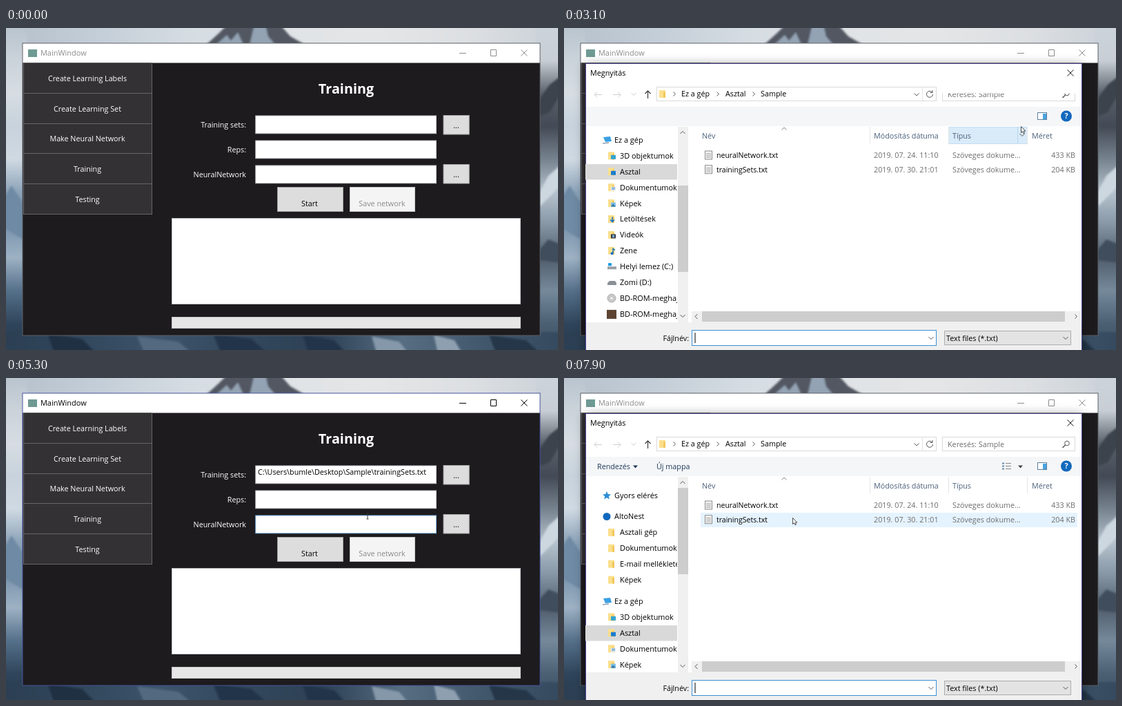
An HTML page that plays this animation: 800x466 px, repeating every 8 s.

```html
<!DOCTYPE html>
<html lang="hu">
<head>
<meta charset="utf-8">
<title>Training</title>
<style>
html, body { margin: 0; width: 100%; height: 100%; overflow: hidden; }
#stage { display: block; width: 800px; height: 466px; font: 10.75px "Open Sans", "Noto Sans", sans-serif; }
text[fill="#fff"]:not([font-weight]) { font-weight: 500; }
.soft { filter: blur(1.6px); }
.k { animation: 8s step-end infinite; }

/* main window */
.title { color: #8c8c8c; animation-name: title; }
.edge { stroke: #5d6068; animation-name: edge; }
.browse { fill: #ddd; stroke: #a0a0a0; }
.sets { animation-name: sets; }
.net { animation-name: net; }
.field { stroke: #c4c6ca; animation-name: field; }
.path { opacity: 0; animation-name: path; }
@keyframes title { 12.5%, 61.25% { color: #000; } 26.25%, 76.25% { color: #8c8c8c; } }
@keyframes edge { 12.5%, 61.25% { stroke: #46559c; } 26.25%, 76.25% { stroke: #5d6068; } }
@keyframes sets {
  22.5%, 28.75% { fill: #bfe1f8; stroke: #5a93bf; }
  25% { fill: #c4e5f6; stroke: #2c628b; }
  57.5% { fill: #ddd; stroke: #a0a0a0; }
}
@keyframes net {
  72.5%, 80% { fill: #bfe1f8; stroke: #5a93bf; }
  75% { fill: #c4e5f6; stroke: #2c628b; }
}
@keyframes field { 63.75% { stroke: #7eb4ea; } 71.25% { stroke: #c4c6ca; } }
@keyframes path { 61.25% { opacity: 1; } }

/* file dialog */
.dialog { opacity: 0; transform-origin: 391px 243px; animation-name: dialog; }
.shadow { filter: drop-shadow(0 3px 8px rgba(0, 0, 0, .45)); }
.content { opacity: 0; animation-name: content; }
.tools { opacity: 0; animation-name: tools; }
.cover { animation-name: cover; }
.column { opacity: 0; animation-name: column; }
.row { fill: #fff; animation-name: row; }
.picked { opacity: 0; animation-name: picked; }
.places { animation-name: places; }
.kids { opacity: 0; animation-name: kids; }
.quick { opacity: 0; animation-name: quick; }
.thumb { y: 228px; height: 125px; animation-name: thumb; }
@keyframes dialog {
  32.5%, 85% { opacity: .05; transform: scale(.93); }
  33.75%, 86.25% { opacity: .15; transform: scale(.945); }
  35%, 87.5% { opacity: .3; transform: scale(.96); }
  36.25%, 88.75% { opacity: .46; transform: scale(.974); }
  37.5%, 90% { opacity: .8; transform: scale(.992); }
  38.75%, 91.25% { opacity: 1; transform: none; }
  57.5% { opacity: .6; transform: scale(.97); }
  58.75% { opacity: .25; transform: scale(.94); }
  60% { opacity: 0; }
}
@keyframes content { 37.5%, 90% { opacity: 1; } 60% { opacity: 0; } }
@keyframes tools { 41.25%, 93.75% { opacity: 1; } 60% { opacity: 0; } }
@keyframes cover { 43.75%, 96.25% { opacity: 0; } 60% { opacity: 1; } }
@keyframes column { 37.5% { opacity: 1; } 43.75% { opacity: 0; } }
@keyframes row { 50%, 96.25% { fill: #e5f3ff; } 55% { fill: #cce8ff; } 60% { fill: #fff; } }
@keyframes picked { 55% { opacity: 1; } 60% { opacity: 0; } }
@keyframes places {
  43.75% { transform: translateY(214.5px); }
  60% { transform: none; }
  96.25% { transform: translateY(161px); }
}
@keyframes kids { 43.75% { opacity: 1; } 60% { opacity: 0; } }
@keyframes quick { 96.25% { opacity: 1; } }
@keyframes thumb {
  43.75% { y: 201px; height: 93px; }
  60% { y: 228px; height: 125px; }
  96.25% { y: 159px; height: 125px; }
}

/* pointer */
.pointer { animation: move 8s linear infinite; }
.arrow { animation-name: arrow; }
.beam { opacity: 0; animation-name: beam; }
@keyframes move {
  0% { transform: translate(700px, 480px); }
  12.5% { transform: translate(700px, 480px); animation-timing-function: steps(8); }
  22.5% { transform: translate(662px, 142px); }
  42.5% { transform: translate(662px, 142px); animation-timing-function: steps(7); }
  51.25% { transform: translate(281px, 209px); }
  61.25% { transform: translate(281px, 209px); animation-timing-function: steps(4); }
  66.25% { transform: translate(524px, 200px); animation-timing-function: steps(5); }
  72.5% { transform: translate(653px, 217px); }
  95% { transform: translate(653px, 217px); animation-timing-function: steps(3); }
  98.75%, 100% { transform: translate(331px, 202px); }
}
@keyframes arrow { 63.75% { opacity: 0; } 71.25% { opacity: 1; } }
@keyframes beam { 63.75% { opacity: 1; } 71.25% { opacity: 0; } }
</style>
</head>
<body>
<svg id="stage" viewBox="0 0 800 466"></svg>
<script>
const group = (cls, ...parts) => `<g class="k ${cls}">${parts.join('')}</g>`;

// y is the middle of the capitals
const text = (x, y, s, fill = '#000', anchor = 'start', extra = '') =>
  `<text x="${x}" y="${y + 3.9}" fill="${fill}" text-anchor="${anchor}" ${extra}>${s}</text>`;

const rect = (x, y, w, h, fill, stroke, cls = '') => {
  const o = stroke ? .5 : 0;
  return `<rect x="${x + o}" y="${y + o}" width="${w - 2 * o}" height="${h - 2 * o}" ` +
    `fill="${fill}" stroke="${stroke || 'none'}" class="${cls}"/>`;
};

const path = (d, stroke = 'none', fill = 'none', w = 1) =>
  `<path d="${d}" stroke="${stroke}" fill="${fill}" stroke-width="${w}"/>`;
const circle = (x, y, r, fill, stroke = 'none') =>
  `<circle cx="${x}" cy="${y}" r="${r}" fill="${fill}" stroke="${stroke}"/>`;
const down = (x, y, c = '#555') => path(`M${x - 3.5} ${y - 2}l3.5 3.5 3.5-3.5`, c);
const up = (x, y, c = '#555') => path(`M${x - 3.5} ${y + 2}l3.5-3.5 3.5 3.5`, c);
const right = (x, y, c = '#555') => path(`M${x - 1.5} ${y - 3}l3 3-3 3`, c);
const left = (x, y, c = '#555') => path(`M${x + 1.5} ${y - 3.5}l-3.5 3.5 3.5 3.5`, c);
const cross = (x, y, c) => path(`M${x - 4.5} ${y - 4.5}l9 9m0-9l-9 9`, c);

// evenly spaced colour stops
const gradient = (id, x2, y2, ...colors) =>
  `<linearGradient id="${id}" x2="${x2}" y2="${y2}">` +
  colors.map((c, i) => `<stop offset="${i / (colors.length - 1)}" stop-color="${c}"/>`).join('') +
  '</linearGradient>';

// soft tones of a snowy ridge around the window
function mountains() {
  const slope = (x, y, w, c) => path(`M${x} ${y}l${w} 8 ${w * .4} 20h${-w * 1.2}z`, 'none', c);
  return '<defs>' +
    gradient('sky', 1, 0, '#b4bfca', '#c3cdd7', '#d5dce2', '#dfe3e6', '#e4e5e6', '#dcdfe2', '#c9d0d7') +
    gradient('west', 0, 1, '#b9c4ce', '#cbd3da', '#d6dce2', '#c7d2dc', '#cfd9e2', '#8ca3b8', '#7893ac',
      '#9db1c3', '#55708a', '#2f455b', '#25374a') +
    gradient('east', 0, 1, '#ccd3da', '#c8ced4', '#59606a', '#434a55', '#76838f', '#b6c3ce', '#8595a4',
      '#505d6c', '#75899b', '#4c6074', '#34475a') +
    gradient('south', 1, 0, '#2b3e52', '#31475c', '#3c536a', '#33485d', '#2d4054', '#566d82', '#41576c',
      '#34495e') + '</defs>' +
    '<g class="soft">' +
    rect(-9, -9, 818, 40, 'url(#sky)') + rect(-9, 0, 40, 475, 'url(#west)') +
    rect(768, 0, 41, 475, 'url(#east)') + rect(-9, 440, 818, 35, 'url(#south)') +
    path('M286 28l22-20 14-14h74l16 18 28 16z', 'none', '#525762') +
    path('M300 28l20-18 6 8 10-12 10 22zM352 28l8-34h16l4 18 14 16z', 'none', '#93a3b4') +
    path('M772 104l16-22 18-14v24l-18 30-16 6z', 'none', '#3c434d') +
    path('M772 240l14-26 20-18v30l-34 34z', 'none', '#cdd7e0') +
    path('M772 322l14-16 20 8v26l-34-4z', 'none', '#3f4d5c') +
    path('M-6 250l14-22 20 30v50l-34-20z', 'none', '#6f8aa4') +
    slope(60, 442, 50, '#1f3042') + slope(190, 446, 60, '#52697f') + slope(300, 442, 56, '#22344a') +
    slope(430, 444, 46, '#22344a') + slope(530, 446, 40, '#8498a9') + slope(620, 444, 30, '#8ea0b0') +
    slope(700, 444, 54, '#243648') + '</g>';
}

function mainWindow() {
  const menu = ['Create Learning Labels', 'Create Learning Set', 'Make Neural Network', 'Training', 'Testing'];
  const items = menu.map((s, i) => {
    const y = 51 + i * 43.75;
    return rect(25, Math.round(y) - 1, 187, 45, '#333133', '#666466') + text(118, y + 22, s, '#fff', 'middle');
  });
  const labels = ['Training sets:', 'Reps:', 'NeuralNetwork'];
  const fields = labels.map((s, i) =>
    text(348, 140 + 36 * i, s, '#fff', 'end') +
    `<rect x="361.8" y="${127 + 36 * i}" width="261.700" height="25.700" fill="#fff" ` +
    (i < 2 ? 'stroke="#c4c6ca"/>' : 'class="k field"/>'));
  const browse = (y, cls) => rect(634, y + .5, 37.3, 27.5, '#ddd', '', 'k browse ' + cls) +
    text(652.5, y + 15, '...', '#000', 'middle');
  return rect(24, 22, 750, 423, '#1d1b1d') +
    rect(24, 22, 750, 28.5, '#fff') + rect(32, 31, 13, 11, '#6f9a94') +
    group('title',
      text(50, 36.5, 'MainWindow', 'currentColor', 'start', 'font-size="10.95"'),
      path('M657 36.5h10M702.5 31.5h8v9h-8z', 'currentColor'), cross(751, 36, 'currentColor')) +
    items.join('') +
    text(493, 91, 'Training', '#fff', 'middle', 'font-size="19.8" font-weight="700"') +
    fields.join('') +
    group('path', text(365, 136.5, 'C:\\Users\\bumle\\Desktop\\Sample\\trainingSets.txt')) +
    browse(126, 'sets') + browse(197, 'net') +
    rect(393, 230, 96, 36, '#ddd', '#a0a0a0') + text(440, 254, 'Start', '#000', 'middle') +
    rect(498, 230, 95, 36, '#f4f4f4', '#c4c7c9') + text(545, 254, 'Save network', '#8a8a8a', 'middle') +
    rect(240, 275, 506, 125, '#fff', '#b8bac0') +
    rect(240, 418, 506, 17, '#e6e6e6', '#c4c4c4') +
    `<rect x="24" y="22" width="750" height="423" fill="none" class="k edge"/>`;
}

// small pictures in the folder tree, centred on x, y
function icon(kind, x, y) {
  const folder = rect(x - 5, y - 5.5, 9, 11, '#fbdf8c') + rect(x + 1, y - 3, 3, 8.5, '#f2c75c');
  const badge = c => folder + rect(x - 1, y - 1, 7, 6, c);
  switch (kind) {
    case 'folder': return folder;
    case 'cube': return badge('#35a4cf');
    case 'desk': return badge('#1c7cd0');
    case 'doc': return badge('#e9f1f8') + path(`M${x} ${y + .5}h5m-5 2h5`, '#4a86c0');
    case 'image': return badge('#7fbfe8') + path(`M${x - 1} ${y + 5}l3-4 4 4z`, 'none', '#3279a8');
    case 'load': return folder + path(`M${x + 1} ${y - 3}v7m-3-3l3 3 3-3`, '#1673c9', 'none', 1.6);
    case 'film': return badge('#333a44') + rect(x + 1, y, 3, 4, '#7aa7d0');
    case 'note': return folder + path(`M${x + 2} ${y + 4}v-7l3 2`, '#1673c9', 'none', 1.4) + circle(x + .5, y + 4, 2, '#1673c9');
    case 'pc': return path(`M${x - 5} ${y - 4}l10-1 2 7-9 1z`, 'none', '#3aa0e4') + path(`M${x - 6} ${y + 5}l9-1`, '#8ba0b3', 'none', 1.5);
    case 'cloud': return circle(x, y, 5.5, '#1068bd');
    case 'system': return rect(x - 6, y, 13, 4, '#9aa0a6') + rect(x - 5, y - 5, 5, 4, '#1c9be0');
    case 'drive': return path(`M${x - 6} ${y + 1}l3-3h8l2 3v3h-13z`, 'none', '#8b9197');
    case 'disc': return circle(x, y, 6, '#c9c9c9', '#aaa') + circle(x, y, 1.5, '#fff');
    case 'brown': return rect(x - 7, y - 6, 14, 13, '#5d4432');
    case 'star': return path(`M${x} ${y - 6}l1.7 4 4.3.4-3.2 2.9 1 4.2-3.8-2.2-3.8 2.2 1-4.2-3.2-2.9 4.3-.4z`, 'none', '#2b8fd9');
  }
}

// rows of [label, picture] below an optional heading
function branch(y, head, kids) {
  const step = 22.9;
  return (head ? icon(head[1], 62, y) + text(73, y, head[0]) : '') +
    kids.map(([s, kind], i) => {
      const ky = y + step * (i + 1);
      return icon(kind, 69, ky) + text(81, ky, s);
    }).join('');
}

function tree() {
  const folders = names => names.map(s => [s, 'folder']);
  const places = [['3D objektumok', 'cube'], ['Asztal', 'desk'], ['Dokumentumok', 'doc'], ['Képek', 'image'],
    ['Letöltések', 'load'], ['Videók', 'film'], ['Zene', 'note'], ['Helyi lemez (C:)', 'system'],
    ['Zomi (D:)', 'drive'], ['BD-ROM-meghajtó', 'disc'], ['BD-ROM-meghajtó', 'brown']];
  return `<svg x="31" y="143" width="133" height="283" viewBox="31 143 133 283" font-size="10.9">` +
    group('kids', branch(132, null, folders(['Designs', 'Sample', 'Testing', 'Testing2']))) +
    group('quick', branch(170, ['Gyors elérés', 'star'], [])) +
    group('places', rect(31, 197, 133, 22.5, '#d9d9d9'),
      branch(39.5, ['AltoNest', 'cloud'], folders(['Asztali gép', 'Dokumentumok', 'E-mail mellékletek', 'Képek'])),
      branch(162, ['Ez a gép', 'pc'], places)) + '</svg>' +
    rect(165, 143, 15, 283, '#f0f0f0') + up(172, 151) + down(172, 417) +
    '<rect x="165" width="15" fill="#cdcdcd" class="k thumb"/>';
}

function addressBar() {
  const crumbs = [[160, 170, 'Ez a gép'], [223, 234, 'Asztal'], [275, 285, 'Sample']];
  return path('M55 96.500h-11m4-4l-4 4 4 4M71 96.500h11m-4-4l4 4-4 4', '#cfcfcf') + down(101, 96, '#ccc') +
    path('M121.500 102v-11m-4 4l4-4 4 4', '#444', 'none', 1.3) +
    rect(134, 85, 406, 21, '#fff', '#d9d9d9') + path('M519.5 86v19', '#e3e3e3') + icon('folder', 143, 95.5) +
    crumbs.map(([a, x, s]) => right(a, 95.5) + text(x, 95.5, s)).join('') +
    down(511, 96.5) + path('M533.5 93a4.500 4.500 0 1 0 1 3M534 90v3.500h-3.500', '#555') +
    rect(548, 85, 193, 21, '#fff', '#d9d9d9') + text(556, 96, 'Keresés: Sample', '#6d6d6d') +
    circle(729, 94.5, 3.3, 'none', '#555') + path('M726.5 97l-4 4', '#555', 'none', 1.4) +
    rect(546, 84, 197, 10.5, '#fff', '', 'k cover');
}

function toolBar() {
  const ink = '#1e395b';
  return rect(32, 114, 718, 28, '#f5f6f7') +
    group('tools', text(48, 128, 'Rendezés', ink), path('M100 126.500h7l-3.500 4z', 'none', ink),
      text(134, 128, 'Új mappa', ink),
      path('M635 123.500h3m-3 4h3m-3 4h3', '#6689a8', 'none', 2), path('M640 123.500h8m-8 4h8m-8 4h8', '#888'),
      path('M658 126.500h7l-3.500 4z', 'none', '#444')) +
    rect(686, 122, 14, 11, '#fff', '#5b7f9f') + rect(694, 124, 5, 8, '#4aa3df') +
    circle(728, 127.5, 8, '#1369bd') + text(728, 127.5, '?', '#fff', 'middle', 'font-weight="700"');
}

function fileList() {
  const ink = '#4c607a', grey = '#6d6d6d';
  const heads = [[200, 'Név'], [449, 'Módosítás dátuma'], [563, 'Típus'], [678, 'Méret']];
  const files = [['neuralNetwork.txt', '2019. 07. 24. 11:10', '433 KB'], ['trainingSets.txt', '2019. 07. 30. 21:01', '204 KB']];
  return group('column', rect(557, 143, 115, 25, '#d9ebf9', '#c3dff3'), path('M657.5 143v24', '#b5d6ee'), down(664, 155)) +
    path('M443.500 143v24M557.500 143v24M671.500 143v24', '#e5e5e5') + up(319, 145.5, '#888') +
    heads.map(([x, s]) => text(x, 156, s, ink)).join('') +
    `<rect x="198" y="195" width="546" height="21" class="k row"/>` +
    files.map(([name, date, size], i) => {
      const y = 184.5 + 20.7 * i;
      return rect(204, y - 7, 11, 13, '#f8f8f8', '#8a8a8a') +
        path(`M206 ${y - 3}h7m-7 2h7m-7 2h7m-7 2h7`, '#9a9a9a', 'none', .8) +
        text(221, y, name, '#000', 'start', 'font-size="10.55"') + text(449, y, date, grey) +
        text(563, y, 'Szöveges dokume...', grey) + text(741, y, size, grey, 'end');
    }).join('');
}

function dialog() {
  return group('dialog',
    rect(31, 51, 720, 440, '#fff', '', 'shadow'), rect(31, 51, 720, 440, '#fff', '#4a4591'),
    text(38, 65.5, 'Megnyitás'), cross(734, 65, '#222'),
    rect(32, 426, 718, 64, '#f0f0f0'),
    rect(185, 410, 564, 16, '#f0f0f0'), rect(200, 410, 526, 15, '#cdcdcd'),
    left(192, 417.5), right(742, 417.5),
    rect(185, 437, 355, 23, '#fff', '#3a8fd2'), rect(551, 438, 184, 21, '#e3e3e3', '#adadad'),
    group('content', addressBar(), toolBar(), tree(), fileList(),
      text(181, 449, 'Fájlnév:', '#000', 'end'), path('M190 441v15', '#000'), down(532, 449),
      group('picked', text(192, 449, 'trainingSets.txt')),
      text(554, 449, 'Text files (*.txt)'), down(727, 449)));
}

const pointer = '<g class="pointer">' +
  group('arrow', path('M.5.500v9l2-1.800 1.500 3 1.500-.7-1.400-2.900h2.700z', '#222', '#fff', .8)) +
  group('beam', path('M-1.500-4h3m-1.500 0v8m-1.500 0h3', '#333', 'none', .9)) + '</g>';

document.getElementById('stage').innerHTML = mountains() + mainWindow() + dialog() + pointer;
</script>
</body>
</html>
```
